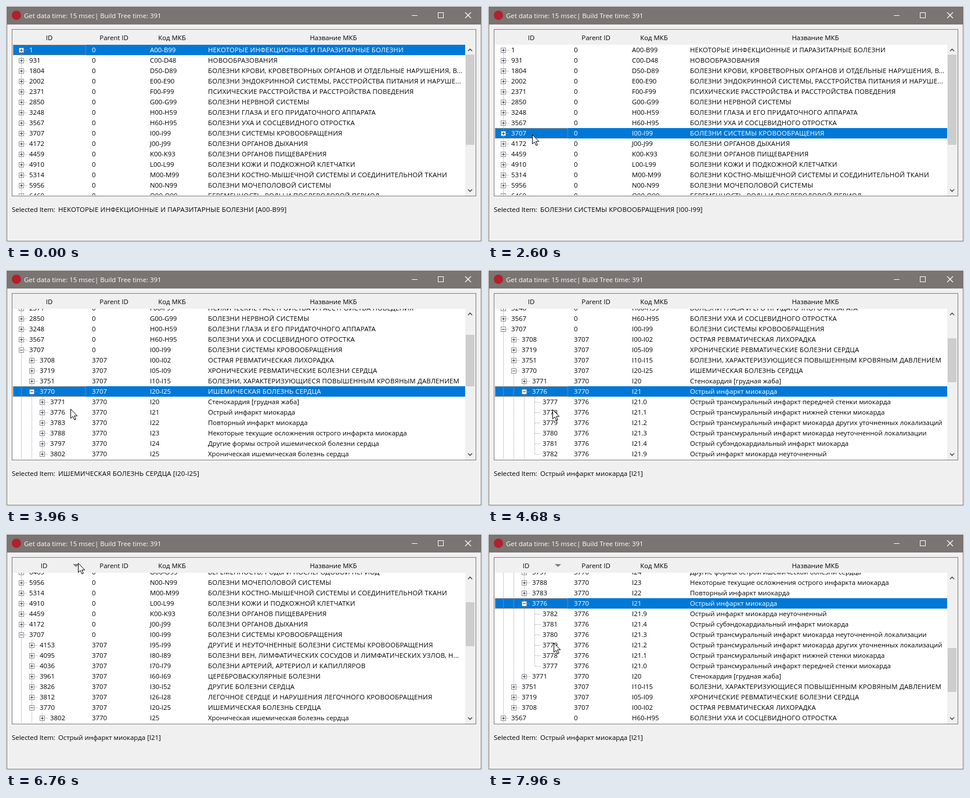
An HTML page with a canvas that plays this animation: 820x408 px, repeating every 8000 ms.

```html
<!DOCTYPE html>
<html lang="ru">
<head>
<meta charset="utf-8">
<style>
html, body { margin: 0; width: 100%; height: 100%; overflow: hidden; background: #f0f0f0; }
canvas { display: block; }
</style>
</head>
<body>
<canvas id="stage" width="820" height="408"></canvas>
<script>
const ctx = document.getElementById('stage').getContext('2d');
const LOOP = 8000, TICK = 40, PRESS = 120, DOUBLE = 200;
const ROW = 18, TOP = 67, VIEW = 260, INDENT = 18, CHAPTERS = 21;
const BLUE = '#0078d7', GRAY = '#a0a0a0';

// id|code|name with leading dots for depth.
// "+" is the next id, a lone letter is a full chapter, "*" counts on from the parent code.
const OUTLINE = `1|A00-B99|НЕКОТОРЫЕ ИНФЕКЦИОННЫЕ И ПАРАЗИТАРНЫЕ БОЛЕЗНИ
931|C00-D48|НОВООБРАЗОВАНИЯ
1804|D50-D89|БОЛЕЗНИ КРОВИ, КРОВЕТВОРНЫХ ОРГАНОВ И ОТДЕЛЬНЫЕ НАРУШЕНИЯ, В...
2002|E00-E90|БОЛЕЗНИ ЭНДОКРИННОЙ СИСТЕМЫ, РАССТРОЙСТВА ПИТАНИЯ И НАРУШЕ...
2371|F|ПСИХИЧЕСКИЕ РАССТРОЙСТВА И РАССТРОЙСТВА ПОВЕДЕНИЯ
2850|G|БОЛЕЗНИ НЕРВНОЙ СИСТЕМЫ
3248|H00-H59|БОЛЕЗНИ ГЛАЗА И ЕГО ПРИДАТОЧНОГО АППАРАТА
3567|H60-H95|БОЛЕЗНИ УХА И СОСЦЕВИДНОГО ОТРОСТКА
3707|I|БОЛЕЗНИ СИСТЕМЫ КРОВООБРАЩЕНИЯ
.+|I00-I02|ОСТРАЯ РЕВМАТИЧЕСКАЯ ЛИХОРАДКА
.3719|I05-I09|ХРОНИЧЕСКИЕ РЕВМАТИЧЕСКИЕ БОЛЕЗНИ СЕРДЦА
.3751|I10-I15|БОЛЕЗНИ, ХАРАКТЕРИЗУЮЩИЕСЯ ПОВЫШЕННЫМ КРОВЯНЫМ ДАВЛЕНИЕМ
.3770|I20-I25|ИШЕМИЧЕСКАЯ БОЛЕЗНЬ СЕРДЦА
..+|*|Стенокардия [грудная жаба]
..3776|*|Острый инфаркт миокарда
...+|I21.0|Острый трансмуральный инфаркт передней стенки миокарда
...+|I21.1|Острый трансмуральный инфаркт нижней стенки миокарда
...+|I21.2|Острый трансмуральный инфаркт миокарда других уточненных локализаций
...+|I21.3|Острый трансмуральный инфаркт миокарда неуточненной локализации
...+|I21.4|Острый субэндокардиальный инфаркт миокарда
...+|I21.9|Острый инфаркт миокарда неуточненный
..+|*|Повторный инфаркт миокарда
..3788|*|Некоторые текущие осложнения острого инфаркта миокарда
..3797|*|Другие формы острой ишемической болезни сердца
..3802|*|Хроническая ишемическая болезнь сердца
.3812|I26-I28|ЛЕГОЧНОЕ СЕРДЦЕ И НАРУШЕНИЯ ЛЕГОЧНОГО КРОВООБРАЩЕНИЯ
.3826|I30-I52|ДРУГИЕ БОЛЕЗНИ СЕРДЦА
.3961|I60-I69|ЦЕРЕБРОВАСКУЛЯРНЫЕ БОЛЕЗНИ
.4036|I70-I79|БОЛЕЗНИ АРТЕРИЙ, АРТЕРИОЛ И КАПИЛЛЯРОВ
.4095|I80-I89|БОЛЕЗНИ ВЕН, ЛИМФАТИЧЕСКИХ СОСУДОВ И ЛИМФАТИЧЕСКИХ УЗЛОВ, Н...
.4153|I95-I99|ДРУГИЕ И НЕУТОЧНЕННЫЕ БОЛЕЗНИ СИСТЕМЫ КРОВООБРАЩЕНИЯ
4172|J|БОЛЕЗНИ ОРГАНОВ ДЫХАНИЯ
4459|K00-K93|БОЛЕЗНИ ОРГАНОВ ПИЩЕВАРЕНИЯ
4910|L|БОЛЕЗНИ КОЖИ И ПОДКОЖНОЙ КЛЕТЧАТКИ
5314|M|БОЛЕЗНИ КОСТНО-МЫШЕЧНОЙ СИСТЕМЫ И СОЕДИНИТЕЛЬНОЙ ТКАНИ
5956|N|БОЛЕЗНИ МОЧЕПОЛОВОЙ СИСТЕМЫ
6469|O|БЕРЕМЕННОСТЬ, РОДЫ И ПОСЛЕРОДОВОЙ ПЕРИОД`;

const root = { id: 0, kids: [], level: -1 };
const byId = {};

function fullCode(code, parent) {
  if (code === '*') return parent.code[0] + (+parent.code.slice(1, 3) + parent.kids.length);
  return code.length === 1 ? `${code}00-${code}99` : code;
}

(function parse() {
  const trail = [root];
  let lastId = 0;
  for (const row of OUTLINE.split('\n')) {
    const level = row.match(/^\.*/)[0].length;
    const [id, code, name] = row.slice(level).split('|');
    const parent = trail[level];
    lastId = id === '+' ? lastId + 1 : +id;
    const node = { id: lastId, code: fullCode(code, parent), name, level, parent, kids: [] };
    parent.kids.push(node);
    trail[level + 1] = byId[lastId] = node;
  }
  // Chapters that never scroll into view
  while (root.kids.length < CHAPTERS)
    root.kids.push({ id: ++lastId, code: '', name: '', level: 0, parent: root, kids: [] });
})();

// Pointer legs: start, end, target x, target y
const LEGS = [
  [600, 600, 214, 383], [600, 1200, 185, 196], [1320, 1400, 179, 195],
  [1400, 2040, 84, 235], [2040, 2240, 77, 222], [2920, 3280, 98, 212],
  [3600, 3960, 112, 240], [4640, 4880, 118, 256], [4880, 5320, 131, 86],
  [5440, 5640, 125, 50], [7200, 7840, 117, 180], [7840, 7960, 114, 188]
];
const PICK = { at: 1200, id: 3567, col: 1 };
const OPENS = [[2480, 3707], [3360, 3770], [4120, 3776]].map(([at, id]) => ({ at, id, col: 0 }));
const SORT_UP = 5640, SORT_DOWN = 6480, WHEEL = 7840;
const PRESSES = [PICK.at, SORT_UP, SORT_DOWN, ...OPENS.flatMap(o => [o.at, o.at + DOUBLE])];

const ease = k => k * k * (3 - 2 * k);
const isOpen = (id, t) => OPENS.some(o => o.id === id && t >= o.at + DOUBLE);

function pointer(t) {
  let [, , x, y] = LEGS[0];
  for (const [from, to, tx, ty] of LEGS.slice(1)) {
    const k = ease(Math.min(1, Math.max(0, (t - from) / (to - from))));
    x += (tx - x) * k;
    y += (ty - y) * k;
  }
  return [Math.round(x), Math.round(y)];
}

function scrollAt(t) {
  if (!isOpen(3707, t)) return 0;
  if (!isOpen(3776, t)) return 19 * ROW - VIEW;
  const notches = Math.max(0, 2 * Math.floor((t - WHEEL) / TICK) - 1);
  return 21 * ROW - VIEW + notches * 3 * ROW;
}

function visibleRows(t, desc) {
  const rows = [];
  (function walk(node) {
    const kids = desc ? [...node.kids].reverse() : node.kids;
    kids.forEach((kid, i) => {
      kid.first = i === 0;
      kid.last = i === kids.length - 1;
      kid.open = isOpen(kid.id, t);
      rows.push(kid);
      if (kid.open) walk(kid);
    });
  })(root);
  return rows;
}

function box(x, y, w, h, color) {
  ctx.fillStyle = color;
  ctx.fillRect(x, y, w, h);
}

function frame(x, y, w, h, color) {
  ctx.strokeStyle = color;
  ctx.lineWidth = 1;
  ctx.strokeRect(x + 0.5, y + 0.5, w - 1, h - 1);
}

function trace(points) {
  ctx.beginPath();
  points.forEach(([x, y]) => ctx.lineTo(x, y));
}

function line(points, color, width) {
  trace(points);
  ctx.strokeStyle = color;
  ctx.lineWidth = width;
  ctx.stroke();
}

function shape(points, color) {
  trace(points);
  ctx.closePath();
  ctx.fillStyle = color;
  ctx.fill();
}

function disc(x, y, r, color) {
  ctx.fillStyle = color;
  ctx.beginPath();
  ctx.arc(x, y, r, 0, 7);
  ctx.fill();
}

function dots(x0, y0, x1, y1, color) {
  ctx.fillStyle = color;
  for (let x = x0; x <= x1; x++)
    for (let y = y0; y <= y1; y++)
      if ((x + y) % 2) ctx.fillRect(x, y, 1, 1);
}

function text(str, x, y, color = '#000', align = 'left') {
  ctx.letterSpacing = /[А-Я]{4}/.test(str) ? '0.18px' : '0px';
  ctx.fillStyle = color;
  ctx.textAlign = align;
  ctx.fillText(str, x, y);
}

function drawWindow() {
  box(0, 0, 820, 408, '#f0f0f0');
  box(1, 1, 818, 31, '#7a7472');
  frame(1, 1, 818, 406, '#7a7472');
  disc(18, 16, 8, '#b3202c');
  text('Get data time: 15 msec| Build Tree time: 391', 31, 21, '#fff');
  box(699, 16, 10, 1, '#fff');
  frame(744, 11, 10, 10, '#fff');
  line([[791, 11], [801, 21]], '#fff', 1.3);
  line([[801, 11], [791, 21]], '#fff', 1.3);
}

function drawHeader(sorted, desc) {
  const label = (str, x) => text(str, x, 59, '#000', 'center');
  label('ID', sorted ? 65.5 : 74.5);
  label('Parent ID', 186);
  label('Код МКБ', 286);
  label('Название МКБ', 564);
  if (!sorted) return;
  const [base, tip] = desc ? [52, 57] : [57, 52];
  shape([[115, base], [126, base], [120.5, tip]], '#808080');
}

function drawBranches(node, y) {
  const mid = y + 9;
  for (let n = node; n !== root; n = n.parent) {
    const x = 26 + n.level * INDENT, own = n === node;
    const from = own && !n.level && n.first ? mid : y;
    const to = n.last ? (own ? mid : y - 1) : y + ROW - 1;
    dots(x, from, x, to, GRAY);
  }
  const x = 26 + node.level * INDENT;
  dots(x, mid, x + 10, mid, GRAY);
  if (node.level === 3) return;
  box(x - 4, mid - 4, 9, 9, '#fff');
  frame(x - 4, mid - 4, 9, 9, '#919191');
  box(x - 2, mid, 5, 1, '#333a55');
  if (!node.open) box(x, mid - 2, 1, 5, '#333a55');
}

function drawSelection(y, col) {
  box(12, y, 779, ROW, BLUE);
  const [left, right] = col ? [138, 237] : [12, 137], bottom = y + ROW - 1;
  for (const edge of [y, bottom]) dots(left, edge, right, edge, '#ff8728');
  for (const edge of [left, right]) dots(edge, y + 1, edge, bottom - 1, '#ff8728');
}

function drawRow(node, y, color) {
  drawBranches(node, y);
  const base = y + 13;
  text(node.id, 40 + node.level * INDENT, base, color);
  [node.parent.id, node.code, node.name].forEach((str, i) => text(str, 148 + i * 100, base, color));
}

function drawScrollbar(scroll, total) {
  box(791, TOP, 17, VIEW + 1, '#f0f0f0');
  const unit = 226 / total;
  box(792, Math.round(84 + scroll * unit), 15, Math.ceil(VIEW * unit), '#cdcdcd');
  for (const [y, dir] of [[76, -1], [319, 1]])
    line([[796, y - dir * 2], [799.5, y + dir * 1.5], [803, y - dir * 2]], '#505050', 1.6);
}

function drawPointer(x, y) {
  const arrow = [[0, 0], [0, 16], [3.6, 12.6], [6.4, 18.6], [8.8, 17.5], [6.1, 11.7], [11.2, 11.7]]
    .map(([dx, dy]) => [x - 0.5 + dx, y + 0.5 + dy]);
  shape(arrow, '#fff');
  line([...arrow, arrow[0]], '#000', 1);
}

function draw(t) {
  const sorted = t >= SORT_UP + 80, desc = t >= SORT_DOWN + 80;
  const picked = [{ at: 0, id: 1, col: 0 }, PICK, ...OPENS].filter(p => t >= p.at).pop();
  const current = byId[picked.id];
  const rows = visibleRows(t, desc), scroll = scrollAt(t);
  ctx.font = '11.4px "Open Sans", "Noto Sans", sans-serif';

  drawWindow();
  box(11, TOP, 797, VIEW + 1, '#fff');
  drawHeader(sorted, desc);

  ctx.save();
  ctx.beginPath();
  ctx.rect(11, TOP, 780, VIEW);
  ctx.clip();
  rows.forEach((node, i) => {
    const y = TOP + i * ROW - scroll;
    if (y <= TOP - ROW || y >= TOP + VIEW) return;
    if (node === current) drawSelection(y, picked.col);
    drawRow(node, y, node === current ? '#fff' : '#000');
  });
  ctx.restore();

  drawScrollbar(scroll, rows.length * ROW);
  frame(10, 40, 800, 289, '#7a7a7a');
  text('Selected Item:', 10, 356);
  text(`${current.name} [${current.code}]`, 90, 356);

  if (t < LEGS[0][0]) return;
  const [x, y] = pointer(t);
  if (PRESSES.some(p => t >= p && t < p + PRESS)) disc(x - 0.5, y - 0.5, 12.5, 'rgba(255, 240, 0, 0.55)');
  drawPointer(x, y);
}

const start = performance.now();
let shown = -1;
function tick() {
  const t = Math.floor(((performance.now() - start) % LOOP) / TICK) * TICK;
  if (t !== shown) draw(shown = t);
  requestAnimationFrame(tick);
}
tick();
</script>
</body>
</html>
```
